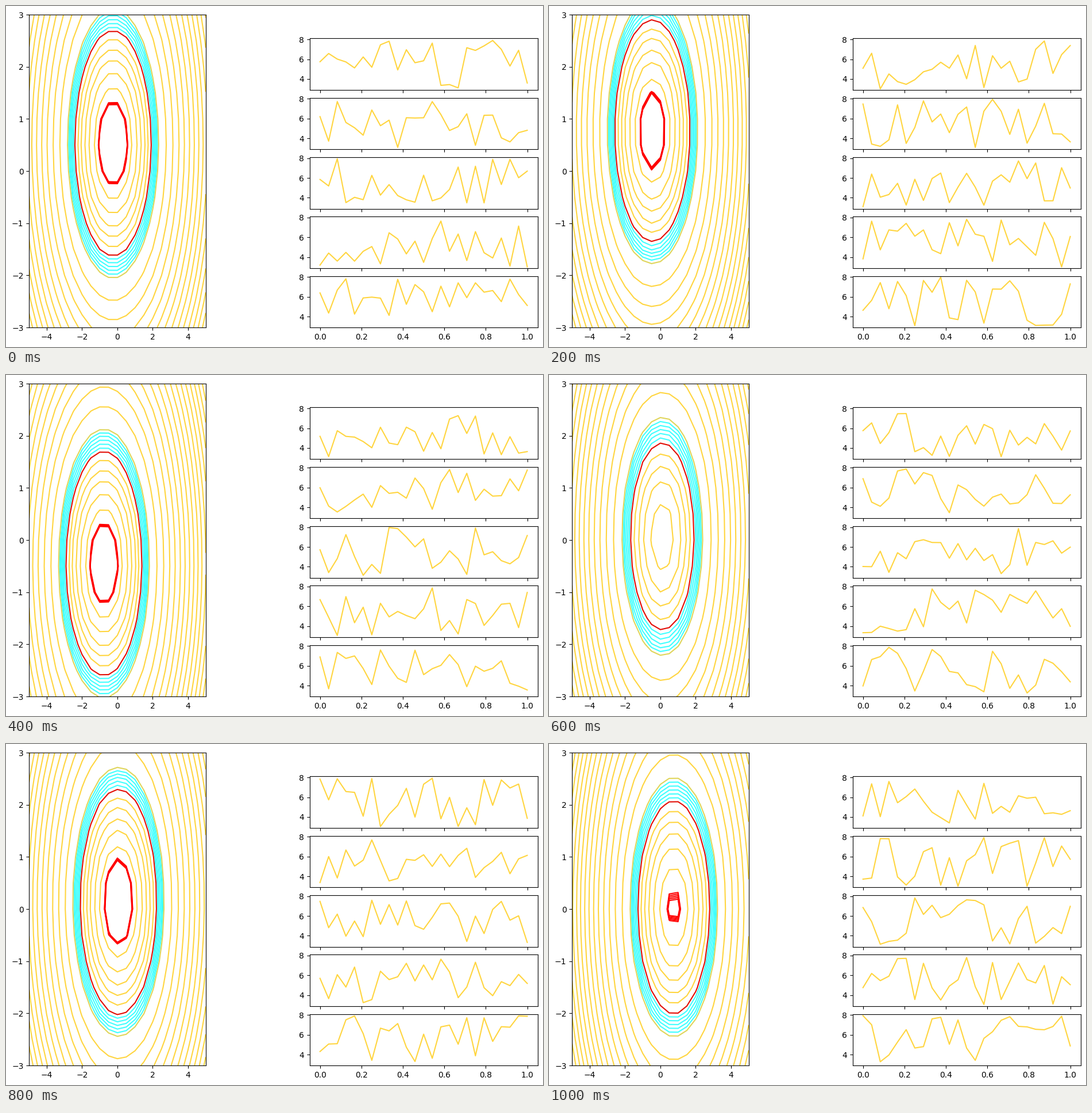
Write a matplotlib script that moves like this. It is 935 px wide and 593 px high and loops after 1200 ms.

```python
import numpy as np
import matplotlib.pyplot as plt
from matplotlib.animation import FuncAnimation

WIDTH, HEIGHT, DPI = 935, 593, 100
ROWS, POINTS = 5, 25
YELLOW, CYAN, RED = "#ffc800", "#00ffff", "#ff0000"
RING_RED, RIM = "#e30d05", "#e0d55a"

# Bowl centre x, centre y and squared radius of the red ring, per step.
BOWLS = [
    (-0.245, 0.535, 4.71),
    (-0.447, 0.775, 4.565),
    (-0.76, -0.445, 4.66),
    (0.11, 0.07, 3.265),
    (0.061, 0.142, 4.70),
    (0.762, 0.035, 4.18),
]

# Contour levels relative to the red ring.
CORE = np.linspace(-4.04, -3.985, 5)
INNER = np.arange(-5, 0) * 0.706
BAND = np.linspace(0, 2, 7)
OUTER = 2 + 2.42 * np.arange(1, 22)

grid_x, grid_y = np.meshgrid(np.linspace(-5, 5, 21), np.linspace(-3, 3, 13))
times = np.linspace(0, 1, POINTS)

fig = plt.figure(figsize=(WIDTH / DPI, HEIGHT / DPI), dpi=DPI)


def pixel_axes(left, top, width, height):
    return fig.add_axes([left / WIDTH, 1 - (top + height) / HEIGHT,
                         width / WIDTH, height / HEIGHT])


bowl_ax = pixel_axes(40.2, 15.1, 307.5, 544)

lines = []
for row in range(ROWS):
    ax = pixel_axes(528.7, 56.42 + row * 103.27, 396.9, 89.6)
    ax.set(xlim=(-0.05, 1.05), ylim=(2.89, 8.1), yticks=[4, 6, 8])
    ax.tick_params(labelbottom=row == ROWS - 1)
    lines += ax.plot(times, np.full(POINTS, 5.0), color=YELLOW, alpha=0.75)

contours = []


def draw_contours(values, levels, colors, alpha=None):
    contours.append(bowl_ax.contour(grid_x, grid_y, values, levels=levels,
                                    colors=colors, alpha=alpha, linewidths=1.5))


def update(step):
    while contours:
        contours.pop().remove()
    cx, cy, ring = BOWLS[step]
    bowl = (grid_x - cx) ** 2 + (grid_y - cy) ** 2
    draw_contours(bowl, ring + BAND[1:-1], CYAN, 0.75)
    draw_contours(bowl, ring + np.concatenate([INNER, OUTER]), YELLOW, 0.75)
    draw_contours(bowl, ring + np.append(CORE, BAND[[0, -1]]),
                  [RED] * len(CORE) + [RING_RED, RIM])
    bowl_ax.set(xlim=(-5, 5), ylim=(-3, 3))

    rng = np.random.RandomState(step)
    for line in lines:
        line.set_ydata(rng.uniform(3, 8, POINTS))
    return lines


anim = FuncAnimation(fig, update, frames=len(BOWLS), interval=200,
                     repeat=True, repeat_delay=0, blit=False)
plt.show()
```
